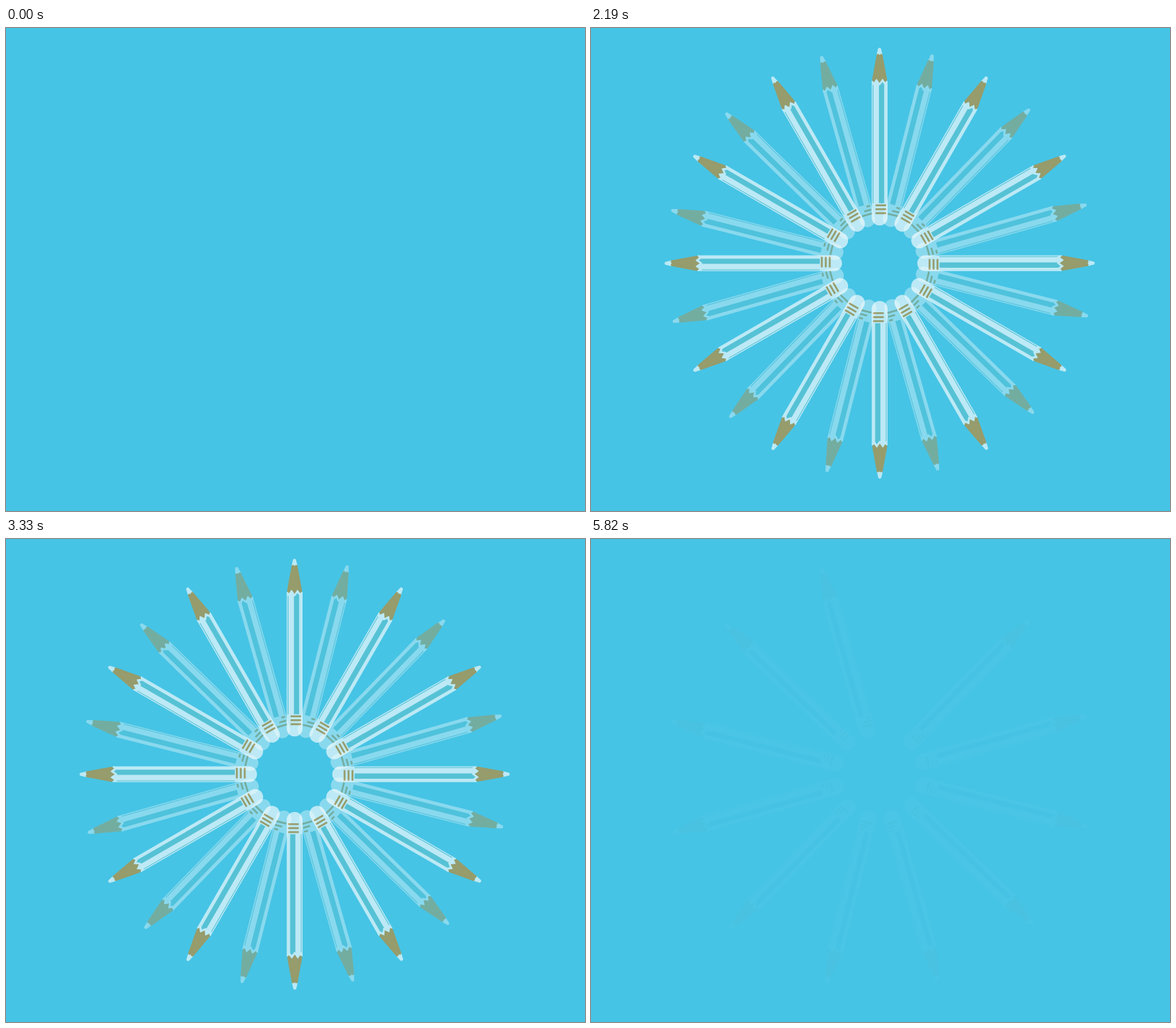
An HTML page for the animation above (7650 ms loop, 820 by 683 pixels).

```html
<!DOCTYPE html>
<html lang="en">
<head>
<meta charset="utf-8">
<title>Pencil wheel</title>
<style>
  html, body { margin: 0; width: 100%; height: 100%; overflow: hidden; background: #46c4e5; }
  svg { display: block; width: 100%; height: 100%; }
  .teal { fill: #5fc1cd; }
  .wood { fill: #c38628; }
</style>
</head>
<body>
<svg viewBox="0 0 820 683">
  <defs>
    <!-- Local origin is the centre of the wheel; the tip points up. -->
    <g id="pencil">
      <path fill="#fff" d="M-11.2 -258 L-9 -257 L-4.3 -261 L0 -255 L4.3 -261 L9 -257 L11.2 -258 V-64.5 A11.2 11.2 0 0 1 -11.2 -64.5 Z"/>
      <path class="wood" d="M-4 -296 H3.8 L10.6 -259 L8 -255.5 L4 -260.5 L-.2 -254.5 L-4.4 -260.5 L-8 -255.5 L-10.8 -259 Z"/>
      <path fill="none" stroke="#fff" stroke-width="1.6" d="M-11 -257 L-8 -254.5 L-4.4 -259.5 L-.2 -253.5 L4 -259.5 L8 -254.5 L10.8 -257"/>
      <path fill="#fff" d="M-4.2 -295 L-2.2 -303.6 Q-.2 -305.6 1.8 -303.6 L3.8 -295 L2 -296 L-.2 -294.5 L-2 -296 Z"/>
      <path class="teal" d="M-1 -252 L0 -251 L4 -256 L6.4 -253 V-84.8 H-1 Z M-9.8 -252 H-8.8 V-84.8 H-9.8 Z"/>
    </g>
    <g id="even">
      <use href="#pencil"/>
      <path class="wood" d="M-5.8 -83.2 h15 v2.6 h-15 Z m0 5.6 h15 v2.6 h-15 Z m0 5.6 h15 v2.6 h-15 Z"/>
    </g>
    <!-- The odd set has a mirrored body and stepped bands. -->
    <g id="odd">
      <use href="#pencil" transform="scale(-1 1)"/>
      <path class="wood" d="M3.7 -83.2 h5.5 v2.6 h-5.5 Z M-1 -77.6 h10.2 v2.6 h-10.2 Z M-5.8 -72 h15 v2.6 h-15 Z"/>
    </g>
  </defs>
  <g id="wheel" transform="translate(408.8 332.6)"></g>
</svg>
<script>
  const LOOP = 7650, TICK = 30, COUNT = 24;
  const PULSE_START = 62, PULSE_END = 123;
  const RISE = [.36, .64, .91], FALL = [.64, .36, .08];
  const RESIDUE = .02;

  const wheel = document.getElementById('wheel');
  const pencils = [];

  function addPencil(i) {
    const odd = i % 2;
    const use = document.createElementNS('http://www.w3.org/2000/svg', 'use');
    use.setAttribute('href', odd ? '#odd' : '#even');
    use.setAttribute('transform', `rotate(${i * 15 - odd * .8})`);
    wheel.append(use);
    pencils[i] = use;
  }
  for (let i = 1; i < COUNT; i += 2) addPencil(i);
  for (let i = 0; i < COUNT; i += 2) addPencil(i);

  const smooth = (from, to, n) => {
    const u = Math.min(1, Math.max(0, (n - from) / (to - from)));
    return u * u * (3 - 2 * u);
  };

  // Opacity of the even pencils while the two sets alternate.
  function pulse(n) {
    const phase = (n + 1) % 6;
    return .1 + .27 * Math.min(phase, 6 - phase);
  }

  function evenOpacity(i, n) {
    if (n >= PULSE_START && n < PULSE_END) return pulse(n);
    if (i === 0) return 1;
    if (n >= PULSE_END) return n < 123 + 1.5 * i ? 1 : 0;
    const age = n - (26 + 1.5 * i);
    return age < 0 ? 0 : RISE[age] ?? 1;
  }

  function oddOpacity(i, n) {
    const step = 1.5 * (i - 1);
    if (n >= PULSE_END) {
      const age = n - (120 + step);
      return i === 1 || age < 0 ? 0 : FALL[age] ?? RESIDUE;
    }
    const flash = FALL[n - (28 + step)] ?? 0;
    return n >= PULSE_START ? Math.max(flash, 1 - pulse(n)) : flash;
  }

  // Slides in with an overshoot, winds up, then slides out.
  function leadOffset(n) {
    return n < 100
      ? -461 + 489 * smooth(-2, 23, n) - 28 * smooth(23, 28, n)
      : -28 * smooth(155, 161, n) + 489 * smooth(161, 200, n);
  }

  function draw(now) {
    const n = Math.floor(now % LOOP / TICK);
    pencils.forEach((pencil, i) => {
      pencil.setAttribute('opacity', i % 2 ? oddOpacity(i, n) : evenOpacity(i, n));
    });
    pencils[0].setAttribute('transform', `translate(${leadOffset(n)} 0)`);
  }

  const start = performance.now();
  function loop() {
    draw(performance.now() - start);
    requestAnimationFrame(loop);
  }
  loop();
</script>
</body>
</html>
```
